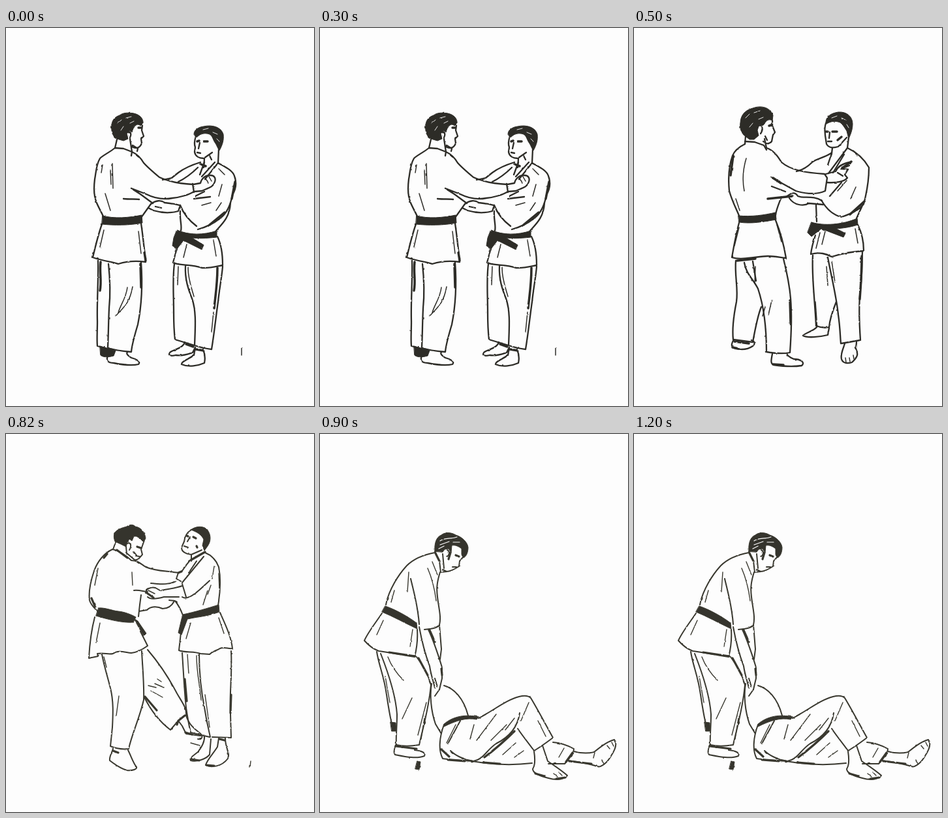
An HTML page that plays this animation: 472x580 px, repeating every 1400 ms.

```html
<!DOCTYPE html>
<html lang="en">
<head>
<meta charset="utf-8">
<title>Judo throw</title>
<style>
html, body { margin: 0; width: 100%; height: 100%; overflow: hidden; background: #fdfdfd; }
svg { display: block; width: 472px; height: 580px; }
path { fill: none; stroke: #2d2c27; stroke-width: 2.3; stroke-linecap: round; stroke-linejoin: round; }
.thin { stroke-width: 1.5; }
.bold { stroke-width: 3.5; }
.solid { fill: #2d2c27; stroke-width: 1; }
.shine { stroke: #fdfdfd; stroke-width: .9; }
.light path { stroke: #39382f; stroke-width: 2; }
.light .thin { stroke-width: 1.4; }
.light .bold { stroke-width: 3.2; }
.light .solid { fill: #35342d; stroke-width: 1; }
.light .shine { stroke: #fdfdfd; stroke-width: 1.2; }

/* Hard cuts: each pose is visible for its own slice of the loop. */
.pose { visibility: hidden; animation: 1400ms step-end infinite; }
#grip { animation-name: grip; }
#step { animation-name: step; }
#sweep { animation-name: sweep; }
#fall { animation-name: fall; }
@keyframes grip { 0% { visibility: visible; } 35.7143%, 100% { visibility: hidden; } }
@keyframes step { 0% { visibility: hidden; } 35.7143% { visibility: visible; } 50%, 100% { visibility: hidden; } }
@keyframes sweep { 0% { visibility: hidden; } 50% { visibility: visible; } 64.2857%, 100% { visibility: hidden; } }
@keyframes fall { 0% { visibility: hidden; } 64.2857%, 100% { visibility: visible; } }
</style>
</head>
<body>
<svg viewBox="0 0 472 580">
<defs>
  <!-- uneven, slightly soft ink -->
  <filter id="ink" filterUnits="userSpaceOnUse" x="0" y="0" width="472" height="580" color-interpolation-filters="sRGB">
    <feTurbulence type="fractalNoise" baseFrequency=".14" numOctaves="2" seed="4"/>
    <feDisplacementMap in="SourceGraphic" scale="2" xChannelSelector="R" yChannelSelector="G"/>
    <feGaussianBlur stdDeviation=".45"/>
  </filter>
</defs>

<g id="grip" class="pose"><g filter="url(#ink)">
  <!-- thrower -->
  <path class="solid" d="M162 148C163 140 168 136 174 134C180 129 190 130 196 131C205 133 211 139 210 147L206 150C202 146 198 149 196 153L193 160L189 157L185 162L187 170L180 173L170 170C162 166 161 156 162 148Z"/>
  <path class="shine" d="M171 146l6-5M184 138l8-2M176 157l4-6M190 146l6-3"/>
  <path d="M209 149L208 157L211 166L207 170L208 177C205 184 200 186 193 182M186 160C190 157 193 162 190 168M170 171L167 184M190 170L193 190M194 180l8 5l-1 4"/>
  <path class="bold" d="M203 153l4 0"/>
  <path d="M167 184L180 185L193 190L192 196M167 184C160 190 149 195 144 200C138 210 138 222 136 232C134 248 135 258 138 266C141 274 146 282 149 289M193 190C202 194 207 200 211 207C218 215 226 221 235 229C248 235 268 239 287 240"/>
  <path d="M286 239L288 252M287 240L298 238C300 230 306 226 313 226C319 226 322 230 320 236C318 243 312 245 307 247L300 250L288 251C280 256 266 260 255 261C240 264 225 260 215 255L192 246M180 262C190 263 199 262 204 263M195 248L206 255L225 269M222 270L207 291"/>
  <path d="M222 270C230 264 238 264 243 268C255 269 262 271 267 272L264 281C250 285 236 283 226 280L218 276M229 274l9 2"/>
  <path class="thin" d="M163 208L164 246M160 218l1 22M152 254L160 280M148 210l-2 12M305 230l5 7M311 228l4 7M150 310l-6 26M203 312l4 34"/>
  <path class="solid" d="M148 288C165 293 190 291 208 287L209 299C190 303 165 303 147 301Z"/>
  <path d="M147 301C142 315 137 335 133 352C150 358 165 359 172 362C185 358 200 357 214 359C212 340 210 320 207 300M141 357C142 385 139 420 140 450C140 465 139 478 140 488L155 492M157 362C160 390 160 410 158 430C157 450 157 470 156 490M207 359C210 400 207 430 202 455C196 475 193 485 192 497C180 496 165 494 157 491"/>
  <path class="bold" d="M145 359C143 375 147 388 144 403M206 362L207 398M212 344l2 13"/>
  <path class="thin" d="M194 397C189 425 178 430 168 442M186 398C184 415 175 425 172 437"/>
  <path class="solid" d="M144 488L157 492L168 495L165 503C155 506 148 505 145 502Z"/>
  <path d="M156 503C153 510 156 514 165 514C180 517 195 518 203 516C207 512 200 508 192 506C186 502 184 500 186 497"/>
  <!-- partner -->
  <path class="solid" d="M288 163C288 156 295 152 303 151C316 148 330 152 333 163C334 172 332 179 327 188C324 184 323 180 321 177C317 172 317 166 312 163C303 160 297 163 292 168Z"/>
  <path class="shine" d="M302 156l8-2M317 160l7 3M323 170l4 4"/>
  <path d="M291 166C289 172 288 178 290 183L289 190C290 197 296 200 303 200L316 191M297 176l-2 9M293 191l5 1M304 201L303 214M326 186L325 207M312 196l3 6"/>
  <path class="bold" d="M293 174l3-1M303 174l6 0"/>
  <path d="M325 207L305 232M320 206L300 228M304 206L297 225M298 206C285 210 272 216 264 222L254 230L240 233M294 214C280 228 270 233 264 236M325 207C335 213 347 218 350 227C354 238 352 248 347 256C344 272 338 285 328 292C318 300 305 306 294 309"/>
  <path d="M267 272C272 285 280 295 292 304M288 262L313 259M290 258L304 251M267 281C266 295 270 303 268 311M344 268C343 290 332 300 322 311"/>
  <path class="bold" d="M351 236L346 262M335 283L312 302M298 209l8 3"/>
  <path class="thin" d="M326 216l9 9M331 240l-5 18M330 268l-8 12M300 272l14-4"/>
  <path class="solid" d="M262 310C280 318 303 318 323 311L323 321C305 323 295 323 285 322L303 333L300 340L272 326L262 339L255 334L257 322Z"/>
  <path d="M263 335C260 345 258 352 256 360C265 365 285 362 300 368C312 369 322 366 332 364C332 345 329 330 324 320M258 362C255 385 257 410 257 435C257 455 258 470 259 478L289 487M275 365C274 385 279 400 285 415C292 435 290 460 289 487C300 491 308 492 315 493C319 470 322 440 325 420C327 400 331 380 332 366"/>
  <path class="bold" d="M324 368C324 392 321 410 319 430"/>
  <path class="thin" d="M279 368C279 385 284 398 288 412M318 436l-3 30M264 366l-1 28M277 332l-5 20M318 326l4 24"/>
  <path d="M274 482C272 490 262 492 252 497C247 502 252 504 260 502C270 504 280 500 286 498L290 490M290 491L288 502C280 508 268 512 269 516C280 521 295 518 304 514C306 505 304 498 302 493"/>
  <path class="bold" d="M276 485l11 4M291 493l12 2"/>
  <path class="thin" d="M361 491v11"/>
</g></g>

<g id="step" class="pose"><g filter="url(#ink)">
  <!-- thrower -->
  <path class="solid" d="M163 146C163 134 170 126 182 123C195 118 209 122 213 134L212 142C207 139 202 142 200 147L197 150L192 148L189 157L191 165L184 171L177 171L168 164C163 158 162 152 163 146Z"/>
  <path class="shine" d="M171 138l6-6M184 130l9-3M177 152l5-6M191 140l7-3"/>
  <path d="M212 142L212 150L216 160L213 164L211 174C207 179 202 178 198 174M191 150C196 147 199 155 194 162M171 166L170 178M200 170L203 184M201 166l3 6"/>
  <path class="bold" d="M207 150l4-1"/>
  <path d="M170 174L185 175L199 180L203 187M170 178C160 183 154 188 151 196C146 210 144 230 146 250C150 265 157 278 161 288M203 184C215 188 221 198 226 206C240 218 262 222 292 224L296 230L293 250C280 256 262 254 248 250L210 229M211 243L232 251M226 259C222 270 218 278 217 287"/>
  <path d="M294 224L309 220C312 213 320 208 330 206M330 211L318 216L328 217L323 225L327 230C322 236 308 238 296 237M312 222l8 5"/>
  <path d="M233 259C240 254 246 250 251 258C260 262 275 256 288 265M238 261C245 272 260 274 268 269L290 271"/>
  <path class="bold" d="M152 196L148 226M205 262L243 258M213 230l12 8"/>
  <path class="thin" d="M172 200C166 220 166 235 169 250M156 262l6 18M161 306l-7 28M219 302l7 26"/>
  <path class="solid" d="M160 288C180 290 200 287 217 283L218 294C200 297 180 301 161 298Z"/>
  <path d="M161 299C156 317 153 335 150 352C165 357 190 350 205 350C215 350 224 352 233 353C230 335 224 312 217 295M156 357C154 380 160 400 157 420C153 440 150 460 152 478L182 482C186 460 190 440 195 428M169 360C172 378 182 384 190 400C200 430 203 465 203 497C215 499 230 500 239 498C241 470 242 440 240 415C238 390 233 370 229 354M182 358L187 388"/>
  <path class="bold" d="M158 357L186 354M239 418L240 452"/>
  <path class="thin" d="M211 418L206 440M201 428l-4 14M186 366l-1 26"/>
  <path d="M153 478C148 486 149 491 156 492C165 494 175 493 182 488C187 484 184 480 180 479M212 500C210 510 209 515 214 517C228 519 245 520 257 518C263 513 255 508 245 508C238 505 234 502 234 499"/>
  <path class="bold" d="M154 481l22 3M151 490l9 2M213 516l16 1"/>
  <!-- partner -->
  <path class="solid" d="M294 147C293 137 300 131 313 129C326 128 335 136 335 147C335 156 332 163 329 170L326 158C322 152 320 148 316 145C308 142 302 143 295 147Z"/>
  <path class="shine" d="M303 138l8-3M318 138l7 3M326 148l3 5"/>
  <path d="M294 146C291 155 293 160 293 165L295 178C299 185 306 184 313 182L326 168M300 160l-1 9M297 174l6 0M304 184L303 192M329 168L327 184"/>
  <path class="bold" d="M294 159l3 0M304 159l7 0M312 172l6-5"/>
  <path d="M327 184L298 223M322 194L305 222M303 192L297 210M302 192C290 200 280 200 273 206C265 214 258 218 249 220M327 184C340 190 352 200 360 214C360 235 356 255 352 270C345 280 330 286 318 290C305 287 295 278 287 264M318 237L300 258M279 272L280 297M352 268L341 292"/>
  <path class="bold" d="M353 266L331 286M319 215l14-10"/>
  <path class="thin" d="M336 188l6 8M326 234l-14 16M340 244l-8 18M293 312l-5 20M285 314l-6 24M339 308l4 22"/>
  <path class="solid" d="M272 298C290 304 320 302 342 292L343 302C330 306 320 307 310 308L324 315L321 321L287 308L272 320L266 314Z"/>
  <path d="M278 318C274 330 272 338 271 347C285 343 295 347 303 351C315 347 335 343 352 342C352 325 347 310 343 302M274 349C272 380 277 415 279 457C287 460 295 460 299 459C300 445 306 430 310 420M297 352C302 380 310 410 313 440C316 460 316 475 317 484C330 482 340 480 347 479C345 450 344 425 347 400C350 380 349 360 350 344"/>
  <path class="bold" d="M349 350C349 372 348 390 346 416"/>
  <path class="thin" d="M295 366L297 395M278 420l2 28M303 358l5 32"/>
  <path d="M280 459C275 465 262 468 259 472C265 476 285 474 297 471L299 460M323 484C321 492 316 500 318 508C320 515 328 515 334 513C343 505 344 500 340 492L341 482"/>
  <path class="thin" d="M324 506l1 7M330 506l1 6M336 502l1 6"/>
</g></g>

<g id="sweep" class="pose light"><g filter="url(#ink)">
  <!-- thrower -->
  <path class="solid" d="M166 152C170 146 178 144 185 142C190 138 196 139 198 142C206 143 213 150 214 160L210 165L205 160L200 157L196 157L193 164L189 161L186 166L184 173L176 169L167 165C165 160 165 156 166 152Z"/>
  <path d="M212 163L207 177L209 185C205 190 202 194 197 193L184 182M186 168C191 165 193 172 189 178M199 187l6 1M196 181l4 5M168 166L164 177M184 173L185 184"/>
  <path class="bold" d="M201 173l6 2"/>
  <path d="M163 177C172 178 186 188 192 194M163 177C150 183 140 196 135 210C130 225 126 240 128 255C130 263 137 268 141 273M192 194C203 194 207 200 214 204C230 211 248 210 264 213L261 222L268 226M264 213L270 210C274 204 278 198 284 192M207 247L205 262L203 280"/>
  <path d="M196 240C205 239 211 242 217 242M214 244C214 238 222 234 229 236L236 240C250 238 262 236 270 233M217 250C222 255 235 252 242 250L265 250M270 230L276 250M222 229C240 231 250 231 260 226M204 272L216 270C222 264 232 264 240 268C250 268 255 262 258 256"/>
  <path class="bold" d="M170 178L186 190M150 190l5-6M216 244l10 7M264 213l5-2M131 252l6 14"/>
  <path class="thin" d="M141 206l-5 26M193 212l1 20M144 290l-6 30M218 240l10 5"/>
  <path class="solid" d="M142 267C152 266 162 271 172 272C182 273 192 277 199 281L195 289C178 290 158 285 138 279ZM196 283L202 287L215 306L211 310Z"/>
  <path d="M136 281C131 300 128 325 127 344L141 341L140 337C150 335 157 339 164 337C172 331 182 335 192 336C202 335 210 330 217 325L206 303M147 338C150 355 155 370 160 390C165 410 164 430 163 450L160 479C172 484 180 484 188 483C193 460 205 435 211 408C212 385 209 355 208 333"/>
  <path d="M217 331C235 352 250 375 262 398C270 412 277 420 276 432M252 454C240 445 225 430 212 404M252 454L264 440"/>
  <path class="bold" d="M213 403L231 424M274 432L264 440L262 446"/>
  <path class="thin" d="M218 386l12 3M222 394l18 10M228 383l14 6M232 376l6 4M173 402l-4 30M150 342l4 16"/>
  <path d="M264 440L270 448L276 460L298 463M276 432C280 445 288 452 296 458C303 463 301 470 294 468M164 483C162 490 158 495 159 501C168 508 175 513 185 516C195 517 201 514 200 511C195 505 192 495 187 485"/>
  <path class="bold" d="M275 458l10 3M164 486l8 3"/>
  <!-- partner -->
  <path class="solid" d="M283 147C290 142 300 140 308 146C315 155 314 165 309 172L304 179L301 171L303 162C300 155 293 150 283 147Z"/>
  <path d="M284 147C277 151 274 157 273 165L269 174C269 181 276 184 284 185L300 178M282 158l-4 7M273 172l6 2M284 185L284 195"/>
  <path class="bold" d="M277 156l2 1M287 158l4 2M292 172l1 2"/>
  <path d="M305 182C315 186 322 193 326 204C330 225 328 245 325 263M303 188L270 228M292 195L280 213M270 250C275 254 285 250 300 236L312 225M259 256C264 262 268 270 271 278M250 255C254 256 260 255 262 258"/>
  <path class="bold" d="M284 193L305 181"/>
  <path class="thin" d="M319 203L316 222M309 240L302 262M314 232l-5 14M326 214l1 24M283 290l-7 24M326 282l8 24"/>
  <path class="solid" d="M271 277C290 273 310 267 326 262L327 273C310 279 300 280 288 282L278 284L269 308L264 305L269 284Z"/>
  <path d="M268 304C267 316 266 322 265 332C275 336 288 333 298 337L312 338C318 332 322 333 328 329C335 326 340 330 347 329C345 310 335 290 328 274M270 336C272 365 273 390 276 420C279 440 281 450 283 458L312 465M296 338C296 370 300 400 305 425C308 445 311 455 313 465M345 333C347 370 342 400 344 430L345 466L316 465"/>
  <path class="bold" d="M274 376l3 34M345 400l-1 28"/>
  <path class="thin" d="M292 340C292 366 297 385 299 408M278 338l2 30M305 400l7 50"/>
  <path d="M304 462C305 472 300 480 294 488C285 495 281 497 283 501C292 503 305 500 312 492L314 468M326 467L324 480C318 490 308 500 306 508C315 512 330 511 340 498C344 490 336 482 336 467"/>
  <path class="bold" d="M284 499l12 2M307 508l12 1M327 468l8 2"/>
  <path class="thin" d="M283 474l14 4M375 502l-1 9"/>
</g></g>

<g id="fall" class="pose light"><g filter="url(#ink)">
  <!-- thrower -->
  <path class="solid" d="M176 180C175 168 178 158 186 155C192 150 202 151 208 155C218 158 226 166 227 174C227 182 224 188 220 190L217 185L217 176C212 172 207 170 202 171L201 182L197 176L191 177L188 181Z"/>
  <path class="shine" d="M184 164C192 158 200 162 210 158M184 170l14-5M182 176l8-4M204 166l10 0"/>
  <path d="M220 188L214 195L213 203C207 207 200 211 194 211L188 208M195 178C200 180 198 187 194 188M203 204l6 0M176 180L183 195L185 212L195 211M188 184L190 206"/>
  <path class="bold" d="M208 186l5 2M200 182l-3 10"/>
  <path d="M176 182C160 185 145 190 133 202C120 216 105 240 101 262M184 212C180 225 178 235 180 250C182 268 186 280 183 293C180 298 170 299 160 300M139 222C143 240 150 262 152 292"/>
  <path d="M152 296C156 318 162 340 168 356C170 370 174 380 176 390M166 300C173 315 180 335 187 358L187 375L183 392M183 293L186 330L184 346M176 375L180 388"/>
  <path class="bold" d="M177 183l6 12M168 301l8 18M186 360l1 10"/>
  <path class="thin" d="M165 206C172 222 176 240 178 256M172 196l8 20M136 212l-2 30M114 240l-5 18M97 286l-10 22M142 300l-4 26"/>
  <path class="solid" d="M100 264C115 269 135 280 148 290L149 299C130 290 112 280 95 273Z"/>
  <path d="M95 275C85 290 73 305 68 317C75 325 82 330 90 333C110 336 130 340 145 342C148 330 150 315 149 300M87 334C90 355 98 370 102 400C105 420 107 432 110 445M93 337C104 365 116 400 118 430C118 450 116 465 117 477C130 480 140 479 152 477C158 450 167 420 170 385C166 370 158 355 148 342"/>
  <path class="bold" d="M106 335L146 341M151 344l14 26M116 479L148 483"/>
  <path class="thin" d="M141 405L126 437M163 412L150 462M160 436l-5 32M104 342C110 358 120 370 128 378M100 372l7 40"/>
  <path class="solid" d="M108 442L116 443L117 456L110 456ZM149 502L154 503L152 515L146 514Z"/>
  <path d="M116 477C113 485 113 490 115 492C130 495 148 499 160 494C163 489 155 486 145 485"/>
  <!-- partner -->
  <path d="M171 383C168 400 170 425 177 445L186 460M190 386C205 390 220 405 227 432M183 392L176 402M190 446C183 465 181 485 188 498C200 500 220 500 240 503C270 508 300 508 325 505M215 440L196 475"/>
  <path class="solid" d="M190 445C205 432 225 430 243 434L240 438C225 435 210 439 190 449Z"/>
  <path d="M243 436C265 425 285 408 305 403C313 401 320 402 323 405C335 425 348 450 357 466C345 475 335 482 328 486C320 475 308 460 303 452M306 428C303 450 290 465 270 475C255 485 250 500 235 502C222 500 208 494 200 486"/>
  <path class="bold" d="M298 456C280 474 268 484 252 496M186 484l12 11M196 500l26 2M250 504l26 2"/>
  <path class="thin" d="M270 430L240 470M286 446L262 470M298 436l-14 18M236 446l-6 22M208 446l-14 28M320 412L308 440M334 440l12 24M300 474l-20 18M312 486l-14 10M374 482l-8 14"/>
  <path d="M328 487C330 500 330 508 326 514C326 520 335 524 350 528C362 532 375 530 379 524C370 516 358 508 349 502L341 478M357 473C370 474 380 478 389 483L388 490L375 506L350 506M389 487C400 490 412 490 420 488C430 480 440 472 451 469C456 475 452 485 446 494C440 505 430 512 425 510C410 505 395 503 380 501"/>
  <path class="bold" d="M387 489L377 503M382 502l34 4M330 521l14 4M362 529l14-2"/>
  <path class="thin" d="M421 489l-2 8M440 478l4 5M447 473l3 6M432 500l3 6M358 521l6 5M366 519l5 5"/>
</g></g>
</svg>
</body>
</html>
```
